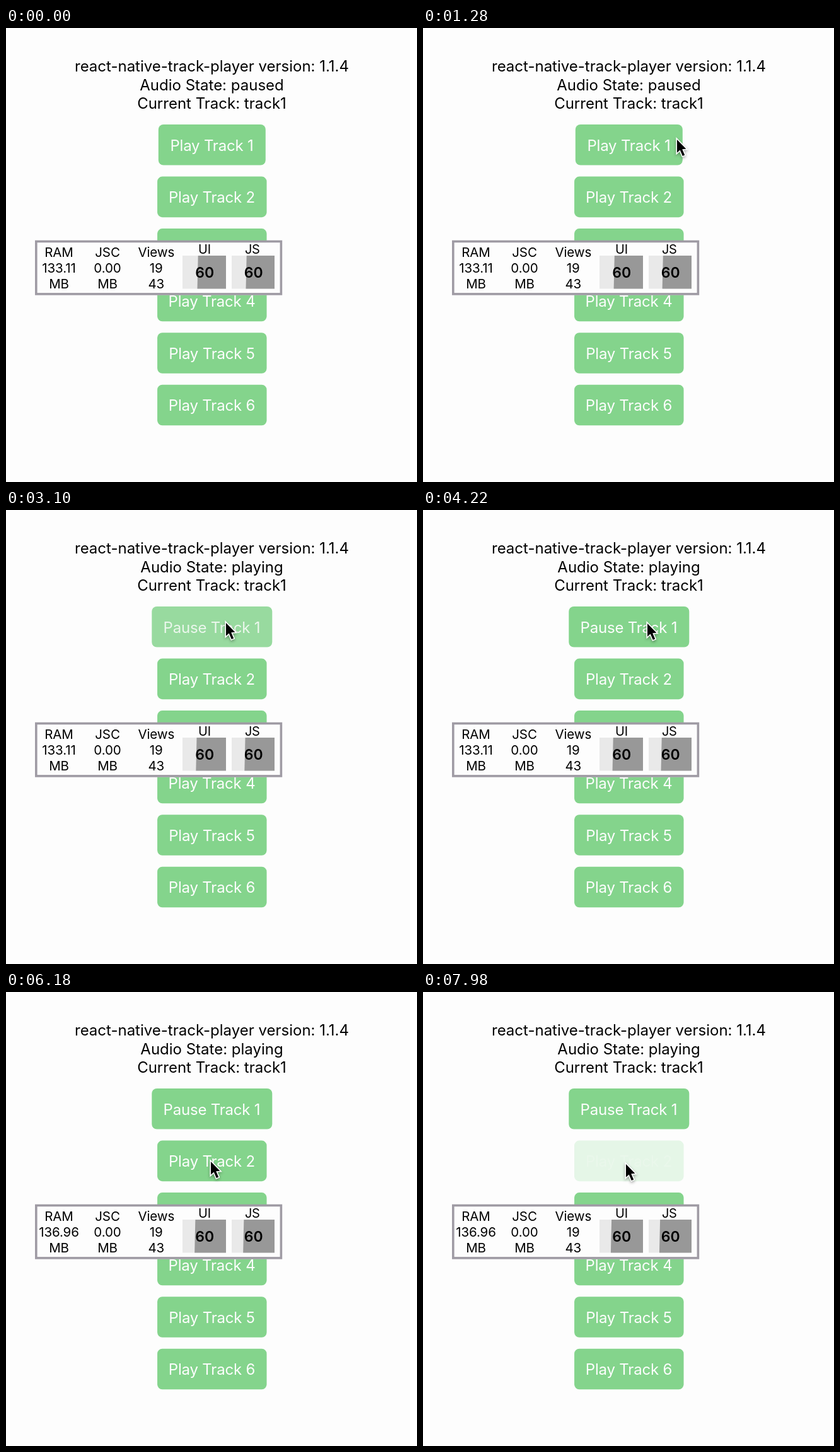
An HTML page with a canvas for the animation above (8000 ms loop, 652 px wide and 720 px high).

```html
<!DOCTYPE html>
<html lang="en">
<head>
<meta charset="utf-8">
<title>Track player</title>
<style>
  html, body { margin: 0; width: 100%; height: 100%; overflow: hidden; background: #fdfdfd; }
  canvas { display: block; width: 652px; height: 720px; }
</style>
</head>
<body>
<canvas id="stage" width="652" height="720"></canvas>
<script>
const LOOP = 8000;
const CENTER = 326.5;
const BACKGROUND = '#fdfdfd';
const GREEN = '#84d48c';
const PLAY_AT = 2960;
const RAM_AT = 5100;
const ctx = document.getElementById('stage').getContext('2d');

const smooth = u => u * u * (3 - 2 * u);
const easeOut = u => 1 - (1 - u) ** 3;
const mix = (a, b, u) => a + (b - a) * u;
const progress = (t, from, to) => Math.min(1, Math.max(0, (t - from) / (to - from)));

// Pointer moves: start, end, target x, target y, easing
const entry = { time: 200, x: 656, y: 205 };
const moves = [
  [200, 1180, 402, 176, easeOut],
  [1380, 1960, 348, 178, smooth],
  [3400, 3900, 355, 179, smooth],
  [4800, 5700, 324, 268, smooth],
  [6600, 7200, 321, 272, smooth]
];

function pointerAt(t) {
  let { x, y } = entry;
  for (const [from, to, toX, toY, ease] of moves) {
    const u = ease(progress(t, from, to));
    x = mix(x, toX, u);
    y = mix(y, toY, u);
  }
  return [x, y];
}

// A touched button fades to 20 % and back
function touchOpacity(t, down, up) {
  const press = smooth(progress(t, down, down + 150));
  const release = smooth(progress(t, up, up + 260));
  return 1 - 0.8 * press * (1 - release);
}

function text(str, x, y, size, { color = '#000', weight = 400, tracking = -0.2 } = {}) {
  ctx.font = `${weight} ${size}px Inter, "Open Sans", sans-serif`;
  ctx.letterSpacing = tracking + 'px';
  ctx.fillStyle = color;
  ctx.fillText(str, x, y);
}

function polygon(points) {
  ctx.beginPath();
  points.forEach(([x, y]) => ctx.lineTo(x, y));
  ctx.closePath();
}

function button(label, width, top, opacity) {
  ctx.globalAlpha = opacity;
  ctx.fillStyle = GREEN;
  ctx.beginPath();
  ctx.roundRect(CENTER + 0.3 - width / 2, top, width, 64.6, 8);
  ctx.fill();
  text(label, CENTER, top + 41.5, 24, { color: '#fdfdfd' });
  ctx.globalAlpha = 1;
}

function graph(label, labelX, left, width, edge) {
  const top = 361, bottom = 413.5;
  text(label, labelX, 358, 20);
  ctx.fillStyle = '#e9e9e9';
  ctx.fillRect(left, top, width, bottom - top);
  ctx.fillStyle = '#989898';
  polygon([[edge + 0.5, top], [left + width, top], [left + width, bottom], [edge - 0.7, bottom]]);
  ctx.fill();
  text('60', left + width / 2 + 0.8, 395.7, 23, { weight: 600, tracking: 0.2 });
}

function column(x, lines) {
  lines.forEach((line, i) => text(line, x, 363.2 + i * 25, 20.5, { tracking: -0.1 }));
}

function monitor(t) {
  ctx.fillStyle = BACKGROUND;
  ctx.fillRect(46, 337, 392, 86.5);
  ctx.strokeStyle = '#9f9ba4';
  ctx.lineWidth = 3.6;
  ctx.strokeRect(47.8, 338.5, 388.6, 83.4);
  column(84, ['RAM', t < RAM_AT ? '133.11' : '136.96', 'MB']);
  column(161, ['JSC', '0.00', 'MB']);
  column(238.3, ['Views', '19', '43']);
  const shift = t / 1000 * 0.7;
  graph('UI', 315, 280, 69, 304.2 - shift);
  graph('JS', 390.8, 358, 68, 381.2 - shift);
}

function cursor(x, y) {
  ctx.save();
  ctx.translate(x + 1, y + 1);
  polygon([[0, 0], [0, 20.8], [4.7, 16.4], [8.8, 26], [12.2, 24.5], [8.2, 15.2], [14.4, 14.8]]);
  ctx.lineJoin = 'miter';
  ctx.lineWidth = 3.2;
  ctx.strokeStyle = '#fff';
  ctx.shadowColor = 'rgba(0,0,0,.35)';
  ctx.shadowBlur = 4;
  ctx.shadowOffsetY = 2;
  ctx.stroke();
  ctx.shadowColor = 'transparent';
  ctx.fillStyle = '#000';
  ctx.fill();
  ctx.restore();
}

function draw(t) {
  const playing = t >= PLAY_AT;
  ctx.fillStyle = BACKGROUND;
  ctx.fillRect(0, 0, 652, 720);
  ctx.textAlign = 'center';
  [
    'react-native-track-player version: 1.1.4',
    'Audio State: ' + (playing ? 'playing' : 'paused'),
    'Current Track: track1'
  ].forEach((line, i) => text(line, CENTER, 69 + i * 29.7, 24, { tracking: 0 }));

  const opacity = [touchOpacity(t, 2640, 2920), touchOpacity(t, 7740, LOOP)];
  for (let n = 1; n <= 6; n++) {
    const first = n === 1;
    const label = `${first && playing ? 'Pause' : 'Play'} Track ${n}`;
    const width = first ? (playing ? 191 : 170) : 173.5;
    button(label, width, 153 + (n - 1) * 82.55, opacity[n - 1] ?? 1);
  }
  monitor(t);
  if (t > entry.time) cursor(...pointerAt(t));
}

const start = performance.now();
function frame() {
  draw((performance.now() - start) % LOOP);
  requestAnimationFrame(frame);
}
frame();
</script>
</body>
</html>
```
